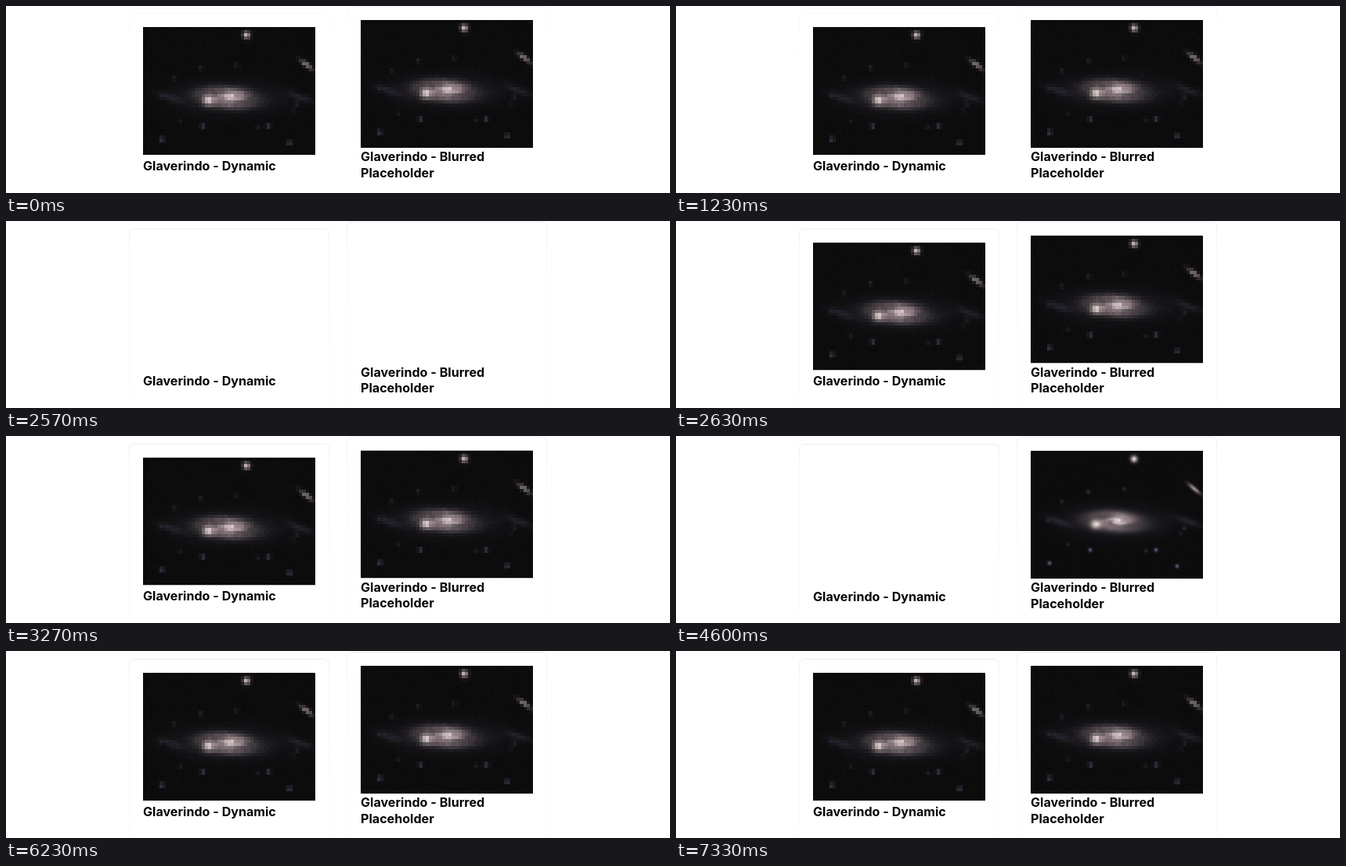
Write an HTML page with a canvas that moves like this. It is 848x240 px and loops after 7360 ms.

```html
<!DOCTYPE html>
<html lang="en">
<head>
<meta charset="utf-8">
<title>Image placeholders</title>
<style>
  html, body { margin: 0; width: 100%; height: 100%; overflow: hidden; background: #fff; }
  #page { position: absolute; left: 0; top: 0; width: 848px; height: 240px; }
  svg { position: absolute; left: 0; top: 0; overflow: visible; }
  canvas { position: absolute; width: 220px; height: 164px; }
  .pixel { image-rendering: pixelated; }
  text { font: 700 16.1px Inter, "Liberation Sans", sans-serif; fill: #050505; }
  .card { fill: none; stroke: url(#edge); }
</style>
</head>
<body>
<div id="page">
  <svg width="848" height="240" viewBox="0 0 848 240">
    <defs>
      <linearGradient id="edge" x1="0" y1="0" x2="0" y2="1">
        <stop offset="0" stop-color="#ededed"/>
        <stop offset=".12" stop-color="#f8f8f8"/>
        <stop offset="1" stop-color="#fcfcfc"/>
      </linearGradient>
    </defs>
    <g id="cards">
      <rect class="card" x="157.5" y="9.5" width="255" height="260" rx="6"/>
      <rect class="card" x="435.5" y="0.5" width="255" height="270" rx="6"/>
    </g>
    <text x="175" y="210.6">Glaverindo - Dynamic</text>
    <text x="453" y="199.4">Glaverindo - Blurred</text>
    <text x="453" y="219.6">Placeholder</text>
  </svg>
</div>
<script>
const W = 220, H = 165, LOOP = 7360;
const page = document.getElementById('page');
const cards = document.getElementById('cards');

const random = n => {
  const s = Math.sin(n * 12.9898 + 4.1) * 43758.5453;
  return s - Math.floor(s);
};

// squared distance in units of a tilted ellipse
function ellipse(dx, dy, rx, ry, tilt = 0) {
  const co = Math.cos(tilt), si = Math.sin(tilt);
  return ((dx * co + dy * si) / rx) ** 2 + ((dy * co - dx * si) / ry) ** 2;
}
const glow = (...shape) => Math.exp(-ellipse(...shape) / 2);

// four clear dots below the galaxy, then a faint seeded scatter around it
const dots = [[24, 145], [76, 128], [160, 128], [187, 149]].map(([x, y]) => ({ x, y, k: 105 }));
for (let i = 0; i < 8; i++) {
  const a = i * Math.PI / 4 + random(i);
  dots.push({ x: 110 + 88 * Math.cos(a), y: 91 + 42 * Math.sin(a), k: 25 + 25 * random(i + 20) });
}

function sky(x, y) {
  const c = [13, 12, 13];
  const add = (k, r, g, b) => { c[0] += k * r; c[1] += k * g; c[2] += k * b; };
  const dx = x - 110, dy = y - 91;

  // two winding arms shade the blue halo and the warm disc
  const d = Math.sqrt(ellipse(dx, dy, 72, 24, .03)) + .02;
  const wave = Math.cos(2 * (Math.atan2(dy / 24, dx / 72) + 2.2 * Math.log(d)));
  add(Math.exp(-2 * d * d) * (1 + .2 * wave), 32, 34, 46);
  const disc = ellipse(dx + 3, dy, 41, 14, .03);
  add(Math.exp(-disc * disc) * (1 + .22 * wave), 68, 54, 48);

  add(glow(dx - 2, dy + 1, 7, 4.5), 108, 102, 96);
  add(glow(dx + 27, dy - 4, 4.5, 4), 145, 140, 135);
  for (const side of [-1, 1]) add(glow(dx - 8 - side * 83, dy, 12, 3, .35), 20, 21, 29);
  add(glow(x - 209, y - 49, 6.5, 1.7, .7), 150, 138, 136);
  add(glow(x - 132, y - 10.5, 3, 3), 215, 198, 194);
  for (const p of dots) add(p.k * glow(x - p.x, y - p.y, 1.7, 1.7), .72, .82, 1.08);
  return c;
}

function photo(cols, rows, sub, left, top) {
  const el = document.createElement('canvas');
  el.width = cols;
  el.height = rows;
  el.style.left = left + 'px';
  el.style.top = top + 'px';
  if (cols < W) el.className = 'pixel';
  const ctx = el.getContext('2d'), img = ctx.createImageData(cols, rows);
  for (let j = 0; j < rows; j++) for (let i = 0; i < cols; i++) {
    const sum = [0, 0, 0], cell = j * cols + i;
    for (let n = 0; n < sub * sub; n++) {
      const x = (i + (n % sub + .5) / sub) * W / cols;
      const y = (j + (Math.floor(n / sub) + .5) / sub) * H / rows;
      sky(x, y).forEach((v, k) => sum[k] += v / (sub * sub));
    }
    const grain = 1 + .16 * (random(cell) - .5);
    sum.forEach((v, k) => img.data[cell * 4 + k] = v * grain);
    img.data[cell * 4 + 3] = 255;
  }
  ctx.putImageData(img, 0, 0);
  return page.appendChild(el);
}

const leftPixel = photo(53, 40, 4, 175, 27);
const rightPixel = photo(53, 40, 4, 453, 18);
const rightSharp = photo(W, H, 1, 453, 18);

const reloads = [2570, 4570];
const show = (el, on) => el.style.visibility = on ? 'visible' : 'hidden';

// each reload: empty cards, then the full picture on the right, then both placeholders
function draw(t) {
  const since = Math.min(...reloads.map(r => t >= r ? t - r : Infinity));
  show(leftPixel, since >= 60);
  show(rightPixel, since >= 60);
  show(rightSharp, since >= 30 && since < 60);
  const step = reloads.filter(r => t >= r).length;
  page.style.transform = `translateY(${step * .5}px)`;
  cards.style.opacity = step ? 1 : .3;
}

const start = performance.now();
function tick() {
  draw((performance.now() - start) % LOOP);
  requestAnimationFrame(tick);
}
tick();
</script>
</body>
</html>
```
